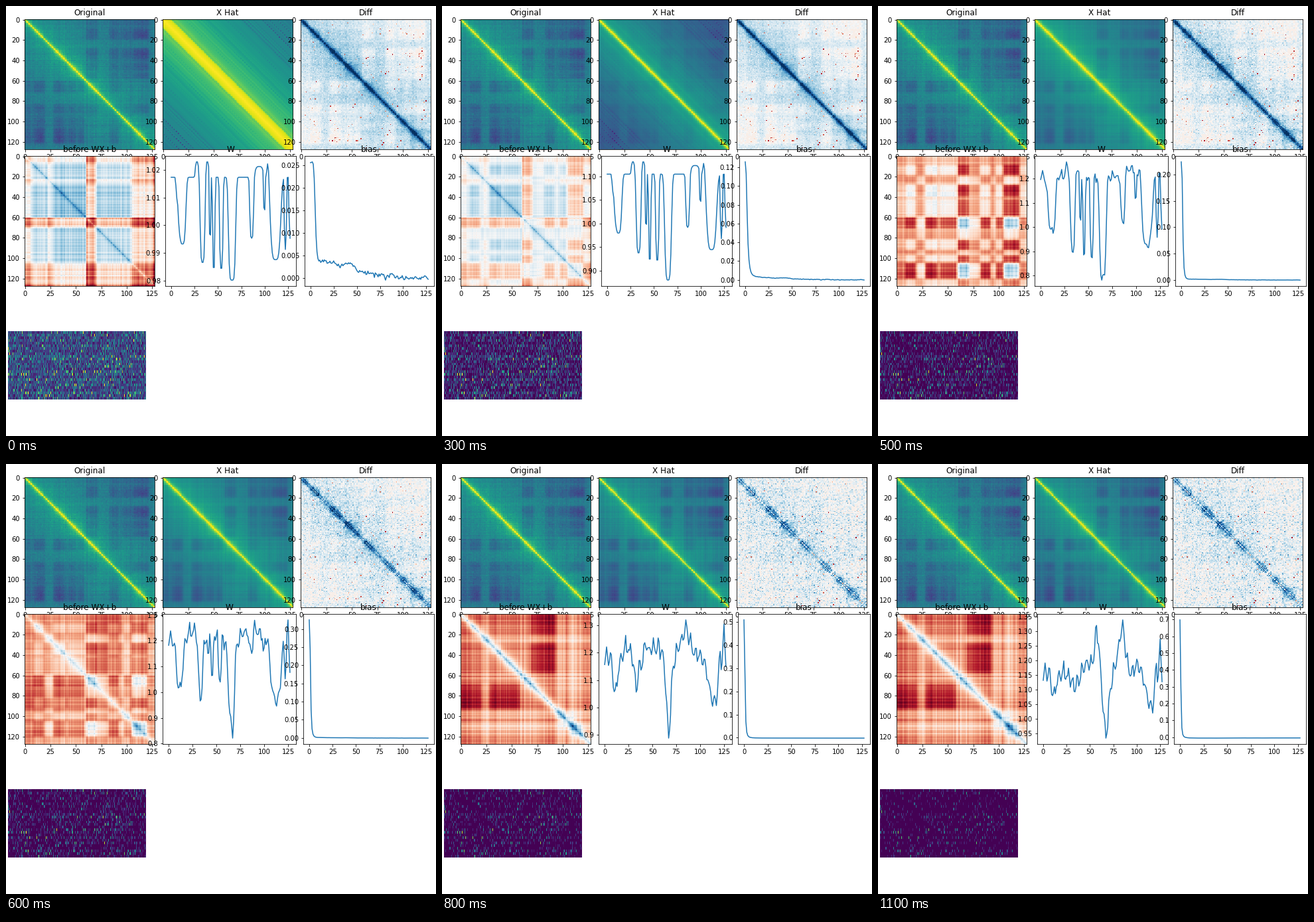
These frames come from a looping animation (648 px wide and 648 px high, 1.2 s). A matplotlib script:

```python
import numpy as np
import matplotlib.pyplot as plt
from matplotlib.animation import FuncAnimation

SIZE, N, FRAMES = 648, 128, 12
KEYS = [0, 2, 4, 5, 7, 9, 11]
rng = np.random.default_rng(7)
x = np.arange(N)
dist = np.abs(x[:, None] - x[None, :])


def key(k, *vals):
    return np.interp(k, KEYS, vals)


def ramp(k, start, end):
    return np.clip((k - start) / (end - start), 0, 1)


def blend(k, times, items):
    """Mix the two items whose times enclose k."""
    j = min(max(np.searchsorted(times, k, side="right") - 1, 0), len(times) - 2)
    t = ramp(k, times[j], times[j + 1])
    return (1 - t) * items[j] + t * items[j + 1]


def bumps(*segs, soft=1.2):
    """Soft boxes, each given as start, end and height."""
    return sum(v * 0.5 * (np.tanh((x - a) / soft) - np.tanh((x - b) / soft))
               for a, b, v in segs)


def hills(*items, p=2):
    """Rounded peaks, each given as centre, half width and height."""
    return sum(v * np.exp(-(np.abs(x - c) / w) ** p) for c, w, v in items)


def decay(core, p, top, mid, far, reach):
    """Sharp peak on the diagonal above a slow fall with distance."""
    return (far + (mid - far) * np.exp(-dist / reach)
            + (top - mid) * np.exp(-(dist / core) ** p))


def sym(m):
    return (m + m.T) / np.sqrt(2)


def add(u):
    return u[:, None] + u[None, :]


def cross(u, v):
    return np.outer(u, v) + np.outer(v, u)


def unit(v):
    return (v - v.min()) / (v.max() - v.min())


# Contact map: distance decay, domains on the diagonal, dark compartments
noise, grain = (sym(rng.normal(size=(N, N))) for _ in range(2))
fine = rng.normal(size=N)
wave = np.convolve(rng.normal(size=N + 4), np.ones(5) / 5 ** .5, "valid")
left = bumps((-3, 7, .5), (9, 19, 1), (28, 40, 1), (42, 50, .8),
             (52, 58, .7), (83, 92, .5), soft=1.8)
right = bumps((60, 72, .7), (83, 92, .6), (95, 104, .6), (106, 122, 1), soft=1.8)
blobs = cross(left, right)
blocks = [bumps((a, b, 1)) for a, b in
          [(0, 7), (8, 18), (28, 40), (42, 58), (62, 72), (82, 93), (97, 106), (107, 121)]]
domains = sum(np.outer(m, m) for m in blocks) * np.exp(-dist / 8)

DECAYS = [decay(8.5, 16, 1, .83, .38, 55), decay(3, 1.5, 1, .6, .22, 70),
          decay(2.2, 1.3, 1, .61, .28, 60), decay(2.6, 1.3, 1, .65, .42, 35),
          decay(1.8, 1, 1, .6, .42, 28)]
contact = (DECAYS[-1] + .08 * domains - .17 * blobs
           + .018 * noise + .012 * add(fine + wave))

lines = .03 * rng.normal(size=N)[dist] * (dist > 10)
dashes = -sum((.04 + .16 * (d > 90)) * (dist == d)
              for d in (22, 38, 62, 78, 88, 97, 104, 112)) * (add(x) // 2 % 2)


def x_hat(k):
    banding, learnt = 1 - ramp(k, 2, 5), ramp(k, 1, 7)
    return (blend(k, [0, 2, 4, 5, 7], DECAYS)
            + banding * (.5 * lines + dashes)
            + learnt * (.08 * domains - .17 * blobs
                        + .006 * noise + .012 * add(fine + wave)))


# Difference map
GAPS = [decay(2.6, 1.6, 1, .42, .2, 22), decay(2.4, 1.6, 1, .38, .13, 20),
        decay(3, 1.4, .45, .15, .08, 40)]
pick = rng.random((N, N))
pick = np.maximum(pick, pick.T)
depth = rng.uniform(-.85, -.15, (N, N))


def diff(k):
    late = ramp(k, 4, 7)
    v = blend(k, [0, 5, 7], GAPS) + (.22 + .2 * late) * domains
    v = v - (.26 - .18 * late) * blobs + (.06 + .1 * late) * grain
    v = np.maximum(v + .03 * add(wave), -.06)
    v = np.where(dist == 0, v - .55 * late, v)
    rate = .08 + (.18 - .15 * late) * np.minimum(blobs, 1)
    return np.where((pick < rate) & (dist > 6), depth, v)


# Matrix before the affine step, one stage per phase of training
near = np.exp(-dist / 2)
u = bumps((-5, 7, -.14), (8, 22, .13), (22, 27, -.06), (28, 60, .2),
          (60, 69, -.4), (70, 105, .11), (105, 132, -.25), (126, 132, -.35),
          soft=.6)
plaid = add(u + .06 * fine) + .3 * near
tone = bumps((-5, 7, .25), (8, 18, .65), (20, 27, -.3), (28, 40, .7),
             (42, 59, .55), (60, 71, -.9), (72, 81, -.3), (82, 92, .55),
             (92, 97, -.2), (97, 104, .5), (105, 120, -.9), (121, 130, .3))
texture = add(.035 * fine + .05 * wave)
product = .75 * np.outer(tone, tone) + .35 * near + .6 * texture
checker = .75 * np.outer(tone, tone) - .3 + texture
early = bumps((-5, 20, .8), (28, 58, 1), soft=2.5)
middle = bumps((68, 93, 1), soft=2.5)
pale = bumps((20, 27, .12), (58, 67, .08), (93, 104, .2), (105, 121, .22), soft=2)


def banded(reach):
    return (-.5 + .7 * np.exp(-(dist / reach) ** 1.2) - .3 * cross(early, middle)
            + add(pale) + .15 * domains + 1.3 * texture)


STAGES = [plaid, .9 * plaid, product, checker, banded(5), banded(6)]

# W: plateaus with sharp dips soften into rounded peaks with a ripple
sharp = unit(
    hills((27.5, 2, .1), (38.5, 2, .1), (94, 5, .07), (103.5, 1.5, .1),
          (7, 2, -.15), (12, 4, -.5), (33.5, 2.8, -.68), (41.5, 1, -.45),
          (45.5, 1.4, -.75), (53.5, 2, -.75), (65, 4, -.95), (86, 2.3, -.45),
          (99.5, 1, -.25), (111.5, 6, -.65), (122, 1.3, -.55),
          (127, 1.2, -.45), p=4))
ripple = .025 * np.cos(2 * np.pi * (x - 2) / 4.9) + .012 * rng.normal(size=N)
edge = hills((120.5, 1.2, .1), (125, 1.2, .13))
mixed = ripple + edge + hills(
    (11, 3, -.15), (24, 5, .06), (33, 2.5, -.14), (43, 2, .08), (50, 4, .05),
    (67, 3, -.32), (85, 8, .1), (114, 7, -.2))
smooth = ripple + edge + hills(
    (11, 3, -.08), (33, 4, -.05), (48, 7, .05), (57.5, 3, .18),
    (67, 4, -.24), (84, 5, .2), (101, 4, .04), (115, 6, -.14))
SHAPES = [sharp ** 1.4, sharp, .9 * sharp + ripple, unit(mixed), unit(smooth)]


def weights(k):
    lo = key(k, .9803, .9316, .829, .782, .860, .914, .933)
    hi = key(k, 1.0228, 1.073, 1.188, 1.268, 1.295, 1.346, 1.338)
    return lo + (hi - lo) * unit(blend(k, [0, 4, 5, 7, 11], SHAPES))


tail = (.0042 * (1 - np.exp(-(x / 8) ** 2)) * np.exp(-(x / 50) ** 2)
        + hills((43, 7, .0012), (65, 8, .0005), (88, 3, .0008))
        + .00025 * rng.normal(size=N) * (x > 9))


def bias(k):
    top = key(k, .0255, .0773, .1745, .2237, .4265, .593, .697)
    width = key(k, 5.2, 2.7, 1.75, 1.65, 1.15, 1, .9)
    power = key(k, 6, 2.5, 3, 3.6, 2.9, 2.95, 3)
    return (top / (1 + (x / width) ** power) + (1 - 1.3 * k / 11) * tail
            - .004 * ramp(k, 5, 11) * (1 - np.exp(-x / 6)))


# Sparse streaks fade as the threshold rises
streaks = rng.gamma(2.2, size=(26, 208)) * rng.uniform(.8, 1.2, (26, 1))


def code_map(k):
    return .12 * streaks - .44 * ramp(k, 1.5, 11) ** .6


fig = plt.figure(figsize=(SIZE / 72, SIZE / 72), dpi=72)
plt.rcParams["font.family"] = "DejaVu Sans"


def box(x0, y0, x1, y1):
    return [x0 / SIZE, 1 - y1 / SIZE, (x1 - x0) / SIZE, (y1 - y0) / SIZE]


def picture(ax, data, cmap, lo):
    return ax.imshow(data, cmap=cmap, vmin=lo, vmax=1, aspect="auto",
                     interpolation="nearest")


def panel(x0, y0, title, cmap, lo):
    ax = fig.add_axes(box(x0, y0, x0 + 196, y0 + 196))
    ax.set_title(title)
    ax.set_xticks(range(0, N, 25))
    ax.set_yticks(range(0, N, 20))
    return picture(ax, contact, cmap, lo)


def plot(x0, x1, title):
    ax = fig.add_axes(box(x0, 226, x1, 422))
    ax.set_title(title)
    return ax.plot(x, x)[0]


panel(28, 20, "Original", "viridis", 0)
im_hat = panel(236, 20, "X Hat", "viridis", 0)
im_diff = panel(444, 20, "Diff", "RdBu", -1)
im_before = panel(28, 226, "before WX+b", "RdBu", -1)
ln_w = plot(240, 437, "W")
ln_b = plot(446, 645, "bias")
ax_code = fig.add_axes(box(3, 490, 211, 593))
ax_code.axis("off")
im_code = picture(ax_code, streaks, "viridis", 0)


def set_line(line, y, x0, step, x1):
    """Update the curve; wider tick labels push the axes to the right."""
    ax = line.axes
    line.set_ydata(y)
    pad = .05 * np.ptp(y)
    ax.set_ylim(y.min() - pad, y.max() + pad)
    labels = ax.yaxis.get_major_formatter().format_ticks(ax.get_yticks())
    extra = max(len(s.lstrip("\u2212-")) for s in labels) - 3
    ax.set_position(box(x0 + step * extra, 226, x1, 422))


def update(k):
    im_hat.set_data(x_hat(k))
    im_diff.set_data(diff(k))
    im_before.set_data(blend(k, [0, 2, 4, 5, 7, 11], STAGES))
    im_code.set_data(code_map(k))
    set_line(ln_w, weights(k), 236, 4, 437)
    set_line(ln_b, bias(k), 446, 2, 645)
    return ()


anim = FuncAnimation(fig, update, frames=FRAMES, interval=100,
                     repeat=True, repeat_delay=0, blit=False)
plt.show()
```
